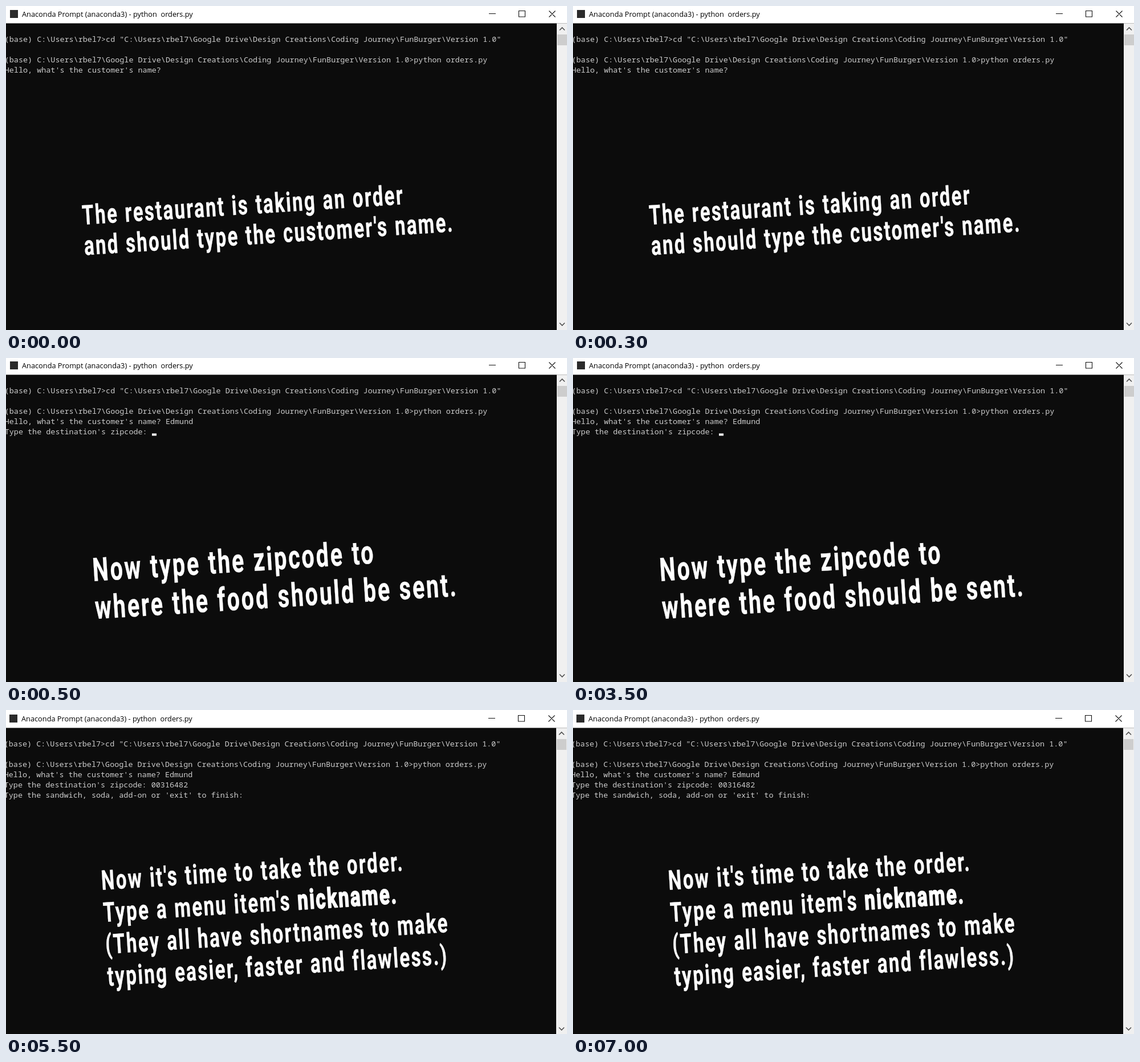
An HTML page for the animation above (8 s loop, 984 by 569 pixels).

```html
<!DOCTYPE html>
<html lang="en">
<head>
<meta charset="utf-8">
<title>Order prompt</title>
<style>
  html, body { margin: 0; width: 100%; height: 100%; overflow: hidden; background: #0c0c0c; }
  svg { display: block; width: 984px; height: 569px; }
  text { white-space: pre; }
  .title { font: 12.78px "Open Sans", sans-serif; }
  .console { font: 500 13.45px "Noto Sans Mono", monospace; fill: #ccc; }
  .caption {
    font-family: Roboto, sans-serif; font-weight: 700; letter-spacing: .072em; word-spacing: .03em;
    fill: #fff; stroke: #fff; stroke-width: .4; stroke-linejoin: round;
  }
  .strong { stroke-width: 2; }
  .icons { fill: none; stroke: #111; stroke-width: 1.1; }
  .arrows { fill: none; stroke: #505050; stroke-width: 1.6; }
</style>
</head>
<body>
<svg viewBox="0 0 984 569">
  <g id="window">
    <rect x="-5" y="-5" width="995" height="35.4" fill="#fff"/>
    <rect x="7" y="7" width="14" height="14" fill="#2b2b2b"/>
    <text class="title" x="28" y="19">Anaconda Prompt (anaconda3) - python  orders.py</text>
    <path class="icons" d="M847 13.5h12M899.5 8.5h11v10.5h-11zM952.5 8.5l11 11m0-11l-11 11"/>
    <rect x="966" y="30.4" width="24" height="545" fill="#f0f0f0"/>
    <rect x="967" y="50" width="17" height="19" fill="#cdcdcd"/>
    <path class="arrows" d="M971 42.5l4.5-4.5 4.5 4.5M971 556.5l4.5 4.5 4.5-4.5"/>
    <g id="console" class="console"></g>
    <rect id="cursor" x="256" y="133.5" width="8" height="4" fill="#fff"/>
  </g>
  <g id="caption" class="caption"></g>
</svg>
<script>
const LOOP = 8000;
const home = "C:\\Users\\rbel7";
const folder = home + "\\Google Drive\\Design Creations\\Coding Journey\\FunBurger\\Version 1.0";
const session = [
  `(base) ${home}>cd "${folder}"`,
  "",
  `(base) ${folder}>python orders.py`,
  "Hello, what's the customer's name? "
];
const named = [...session.slice(0, 3), session[3] + "Edmund"];
const askZip = "Type the destination's zipcode: ";

const scenes = [
  {
    start: 0, shift: [0, 0], console: session,
    caption: { x: 134.5, y: 384, size: 47.7, leading: 53.5, lines: [
      "The restaurant is taking an order",
      "and should type the customer′s name."
    ] }
  },
  {
    start: 500, shift: [0, -1], console: [...named, askZip], cursor: true,
    caption: { x: 153, y: 392, size: 57.2, leading: 66.5, lines: [
      "Now type the zipcode to",
      "where the food should be sent."
    ] }
  },
  {
    start: 5500, shift: [-1, 1],
    console: [...named, askZip + "00316482", "Type the sandwich, soda, add-on or 'exit' to finish:"],
    caption: { x: 168, y: 316, size: 47.9, leading: 56.3, lines: [
      "Now it′s time to take the order.",
      "Type a menu item′s *nickname.*",
      "(They all have shortnames to make",
      "typing easier, faster and flawless.)"
    ] }
  }
];

const byId = id => document.getElementById(id);

function add(parent, tag, content, attributes) {
  const node = document.createElementNS("http://www.w3.org/2000/svg", tag);
  node.textContent = content;
  for (const name in attributes) node.setAttribute(name, attributes[name]);
  return parent.appendChild(node);
}

function show({ shift, console: rows, cursor, caption }) {
  byId("window").setAttribute("transform", `translate(${shift})`);
  byId("cursor").setAttribute("visibility", cursor ? "visible" : "hidden");

  byId("console").replaceChildren();
  rows.forEach((row, i) => add(byId("console"), "text", row, { x: -2.3, y: 62.5 + 18 * i }));

  const group = byId("caption");
  group.replaceChildren();
  group.setAttribute("font-size", caption.size);
  group.setAttribute("transform", `translate(${caption.x} ${caption.y}) rotate(-3.65) scale(.69 1)`);
  caption.lines.forEach((line, i) => {
    const text = add(group, "text", "", { y: caption.leading * i });
    // Asterisks mark the heavier words.
    line.split("*").forEach((part, j) => add(text, "tspan", part, j % 2 ? { class: "strong" } : {}));
  });
}

let current;
function frame() {
  const time = performance.now() % LOOP;
  const scene = scenes.findLast(s => s.start <= time);
  if (scene !== current) show(current = scene);
  requestAnimationFrame(frame);
}
frame();
</script>
</body>
</html>
```
